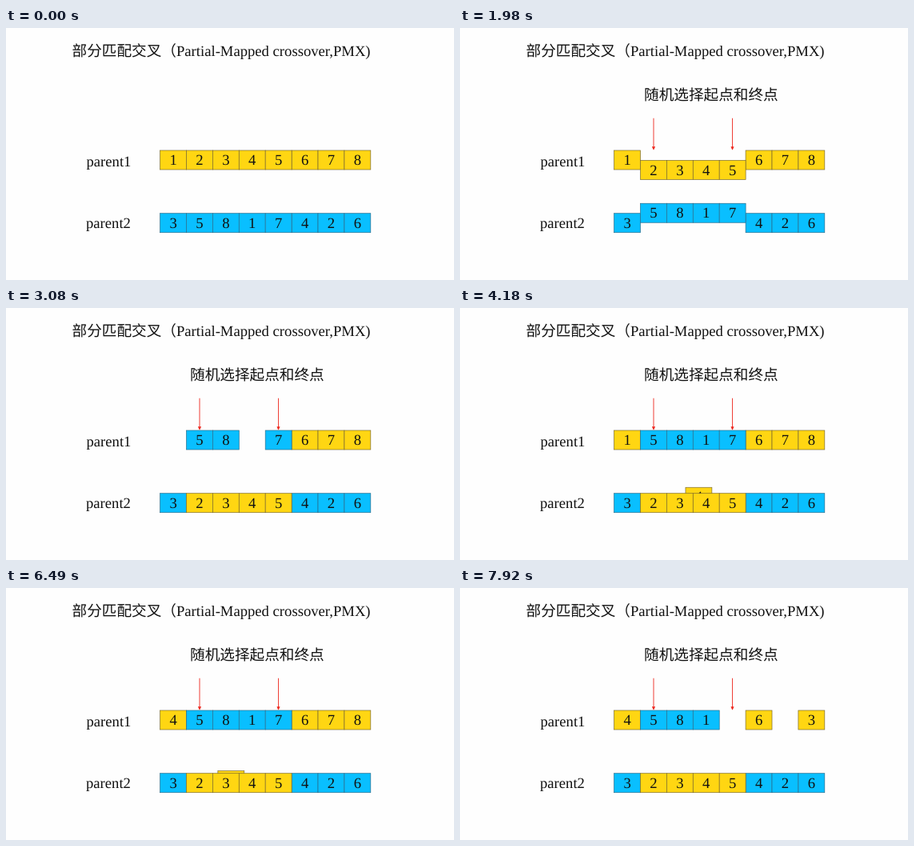
An HTML page that plays this animation: 560x315 px, repeating every 8000 ms.

```html
<!DOCTYPE html>
<html lang="zh-CN">
<head>
<meta charset="utf-8">
<title>PMX</title>
<style>
  html, body { margin: 0; width: 100%; height: 100%; overflow: hidden; background: #fefefe; }
  svg { display: block; width: 560px; height: 315px; }
  text { font: 300 18.65px 'Liberation Serif', 'Noto Sans CJK SC', 'Noto Sans CJK', serif; fill: #111; text-rendering: geometricPrecision; }
  .cell text { text-anchor: middle; }
  .cell rect { stroke-width: .7; }
  .yellow rect { fill: #ffd612; stroke: #7d6c2c; }
  .blue rect { fill: #09bfff; stroke: #2a6d8c; }
  .arrow line { stroke: #ee2a20; stroke-width: .9; }
  .arrow path { fill: #ee2a20; }
</style>
</head>
<body>
<svg id="stage" viewBox="0 0 560 315">
  <text x="82.5" y="34.5">部分匹配交叉（Partial-Mapped crossover,PMX)</text>
  <text x="100.5" y="173">parent1</text>
  <text x="100" y="250">parent2</text>
  <text id="hint" x="230" y="89.5">随机选择起点和终点</text>
</svg>
<script>
const LOOP = 8000, STEP = 110, MOVE = 800;
const LEFT = 192.6, PITCH = 32.9, TOP = 153, BOTTOM = 231.7, HEIGHT = 24;
const GAP = BOTTOM - TOP;
const stage = document.getElementById('stage');
const hint = document.getElementById('hint');

function add(parent, tag, attrs, text = '') {
  const el = document.createElementNS('http://www.w3.org/2000/svg', tag);
  for (const key in attrs) el.setAttribute(key, attrs[key]);
  el.textContent = text;
  return parent.appendChild(el);
}

function cell(parent, column, y, digit, color) {
  const g = add(parent, 'g', { class: 'cell ' + color });
  const x = LEFT + column * PITCH;
  add(g, 'rect', { x, y, width: PITCH, height: HEIGHT });
  add(g, 'text', { x: x + PITCH / 2, y: y + 18.2 }, digit);
  return g;
}

function arrow(x) {
  const g = add(stage, 'g', { class: 'arrow' });
  add(g, 'line', { x1: x, y1: 112.5, x2: x, y2: 149 });
  add(g, 'path', { d: `M${x - 2.2} 148.2h4.4l-2.2 4.6z` });
  return g;
}

// Stacking order: outer cells, travelling copies, swapped segments, arrows.
const layers = [0, 1, 2, 3].map(() => add(stage, 'g', {}));
const [outer, copies, yellowSegment, blueSegment] = layers;

function row(digits, y, color, segment) {
  return [...digits].map((digit, i) =>
    cell(i > 0 && i < 5 ? segment : outer, i, y, digit, color));
}
const yellow = row('12345678', TOP, 'yellow', yellowSegment);
const blue = row('35817426', BOTTOM, 'blue', blueSegment);
const arrows = [
  { el: arrow(242), start: 990, frames: 4 },
  { el: arrow(340.5), start: 1540, frames: 3 }
];

const moves = [
  { el: cell(copies, 3, BOTTOM, '4', 'yellow'), columns: -3, start: 4006, replaced: yellow[0] },
  { el: cell(copies, 2, BOTTOM, '3', 'yellow'), columns: 5, start: 6378, replaced: yellow[7] }
];
const blinks = [
  { start: 2640, cells: [yellow[0], blue[3]] },
  { start: 3410, cells: [blue[3]] },
  { start: 5060, cells: [yellow[7], blue[2]] },
  { start: 5830, cells: [blue[2]] },
  { start: 7480, cells: [yellow[6], blue[4]] }
];

const clamp = v => Math.min(1, Math.max(0, v));
const ease = v => v < .5 ? 2 * v * v : 1 - 2 * (1 - v) ** 2;
const travel = (t, start) => ease(clamp((t - start) / MOVE));
const appear = (t, start, frames) => clamp(((t - start) / STEP + 1) / frames);
const shift = (el, x, y) => el.setAttribute('transform', `translate(${x} ${y})`);
const show = (el, visible) => { el.style.visibility = visible ? 'visible' : 'hidden'; };

function draw(time) {
  const t = time < 2 * STEP ? 0 : Math.floor(time / STEP) * STEP;

  hint.style.opacity = appear(t, 220, 5);
  for (const { el, start, frames } of arrows) {
    const shown = appear(t, start, frames);
    show(el, shown > 0);
    el.style.clipPath = `inset(0 0 ${(1 - shown) * 100}% 0)`;
  }

  const swap = GAP * travel(t, 1755);
  shift(yellowSegment, 0, swap);
  shift(blueSegment, 0, -swap);

  for (const g of [...yellow, ...blue]) show(g, true);
  for (const { el, columns, start, replaced } of moves) {
    const p = travel(t, start);
    show(el, p > 0);
    show(replaced, p < 1);
    shift(el, columns * PITCH * p, -GAP * p);
  }
  for (const { start, cells } of blinks) {
    const n = Math.round((t - start) / STEP);
    if (n >= 0 && n < 6 && n % 2 === 0)
      for (const g of cells) show(g, false);
  }
}

const begin = performance.now();
function tick() {
  draw((performance.now() - begin) % LOOP);
  requestAnimationFrame(tick);
}
tick();
</script>
</body>
</html>
```
